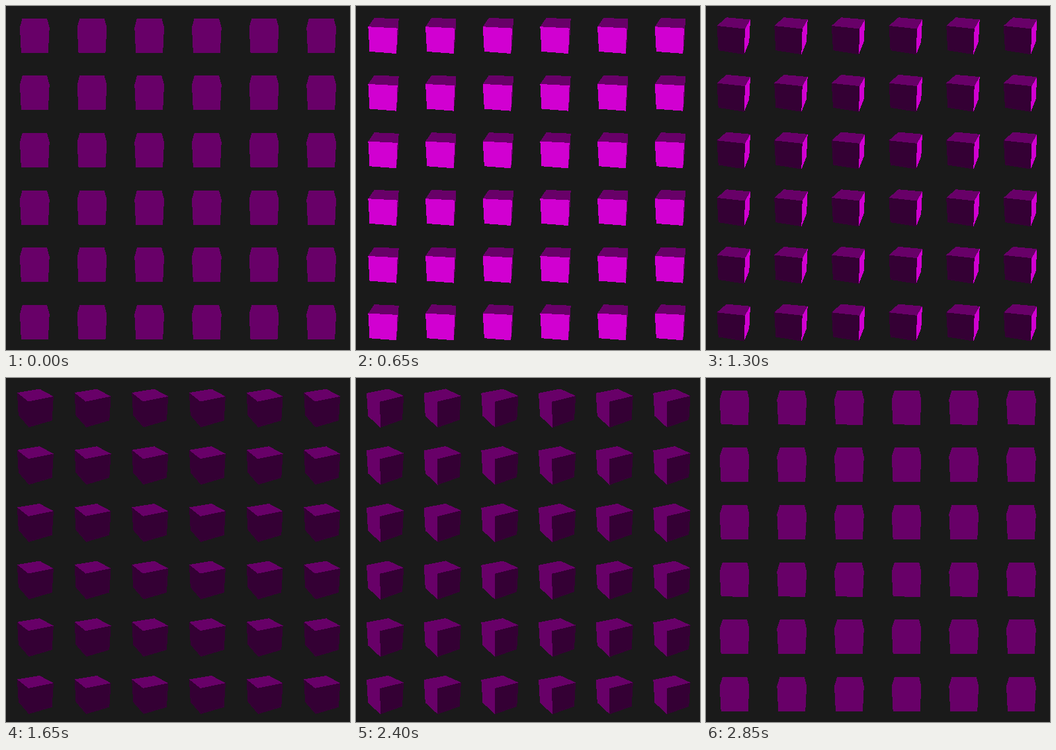
An HTML page for the animation above (2900 ms loop, 520x520 px).

```html
<!DOCTYPE html>
<html lang="en">
<head>
<meta charset="utf-8">
<title>Turning cubes</title>
<style>
  html, body { margin: 0; width: 100%; height: 100%; overflow: hidden; background: #1a1a1a; }
  svg { display: block; width: 100%; height: 100%; }
</style>
</head>
<body>
<svg viewBox="0 0 520 520" shape-rendering="crispEdges"></svg>
<script>
const LOOP = 2900, STEP = 50;
const GRID = 6, CELL = 520 / GRID;
const HALF = 19.5, DEPTH = 200;
const STEP_TURN = 0.11; // radians per step
const QUARTER = Math.PI / 2, EIGHTH = Math.PI / 4;
const PITCH = 25 * Math.PI / 180;
const PITCH_SIN = Math.sin(PITCH), PITCH_COS = Math.cos(PITCH);
// Side colours, each a quarter turn to the left of the one before
const SIDES = ['#680068', '#d100d1', '#340034', '#340034'];
const TOP = '#680068';

const svg = document.querySelector('svg');

function add(parent, tag, attrs) {
  const el = document.createElementNS('http://www.w3.org/2000/svg', tag);
  for (const key in attrs) el.setAttribute(key, attrs[key]);
  return parent.appendChild(el);
}

const cube = add(add(svg, 'defs', {}), 'g', { id: 'cube' });
const faces = [...SIDES, TOP].map(fill => add(cube, 'polygon', { fill }));

for (let i = 0; i < GRID * GRID; i++) {
  add(svg, 'use', {
    href: '#cube',
    x: (i % GRID + 0.5) * CELL,
    y: (Math.floor(i / GRID) + 0.5) * CELL
  });
}

// Corner of the cube at a compass angle, tilted and seen in perspective
function corner(angle, up) {
  const r = HALF * Math.SQRT2;
  const x = r * Math.sin(angle), z = r * Math.cos(angle);
  const y = up * HALF * PITCH_COS - z * PITCH_SIN;
  const near = up * HALF * PITCH_SIN + z * PITCH_COS;
  const scale = DEPTH / (DEPTH - near);
  return [x * scale, -y * scale];
}

function facesViewer([a, b, c]) {
  return (b[0] - a[0]) * (c[1] - a[1]) - (b[1] - a[1]) * (c[0] - a[0]) > 0;
}

function setFace(face, points) {
  face.setAttribute('points', facesViewer(points) ? points.join(' ') : '');
}

function draw(time) {
  const turn = STEP_TURN * Math.floor((time % LOOP) / STEP);
  SIDES.forEach((_, i) => {
    const left = turn - QUARTER * i - EIGHTH, right = left + QUARTER;
    setFace(faces[i], [
      corner(left, 1), corner(right, 1), corner(right, -1), corner(left, -1)
    ]);
  });
  setFace(faces[4], [-3, 3, 1, -1].map(n => corner(turn + n * EIGHTH, 1)));
}

let begin;
function tick(now) {
  begin ??= now;
  draw(now - begin);
  requestAnimationFrame(tick);
}
draw(0);
requestAnimationFrame(tick);
</script>
</body>
</html>
```
